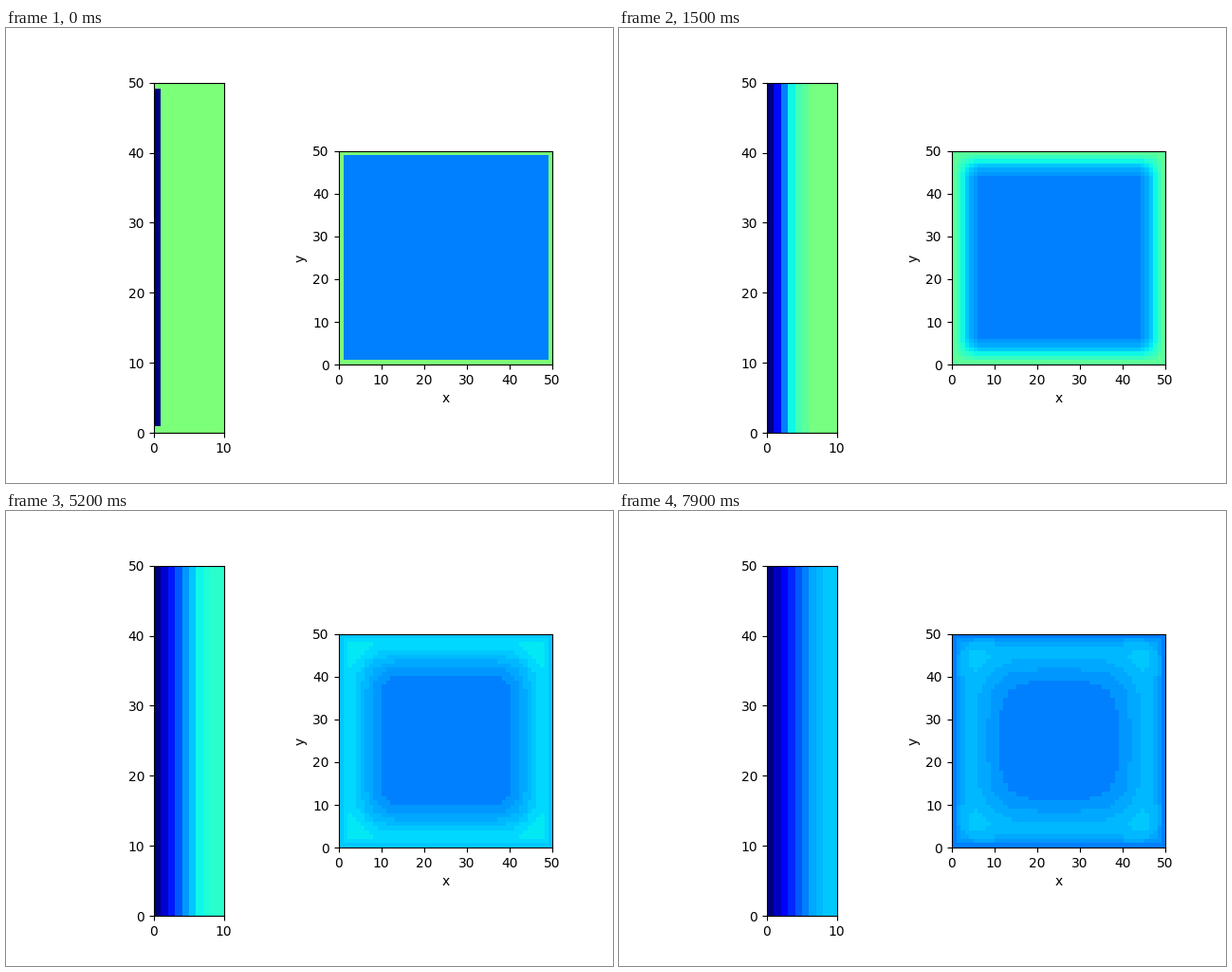
Write a matplotlib script that moves like this. It is 640 by 480 pixels and loops after 8 s.

```python
import numpy as np
import matplotlib.pyplot as plt
from matplotlib.animation import FuncAnimation
from matplotlib.colors import ListedColormap

FRAMES, INTERVAL = 80, 100
N, DEPTH, PROBE = 50, 10, 5

# Jet in 64 flat bands; the three starting values keep their pure colours.
levels = np.arange(0, 256, 4) + 2
levels[[0, 16, 32]] -= 2
cmap = ListedColormap(plt.get_cmap("jet")(levels))


def relax(u):
    """One diffusion step: each inner cell becomes the mean of its neighbours."""
    new = u.copy()
    new[1:-1, 1:-1] = 0.25 * (u[:-2, 1:-1] + u[2:, 1:-1]
                              + u[1:-1, :-2] + u[1:-1, 2:])
    return new


def step_wall(u):
    """Cold left side, insulated elsewhere."""
    u = relax(u)
    u[:, -1] = u[:, -2]
    u[0], u[-1] = u[1], u[-2]
    return u


def step_room(u, edge):
    u = relax(u)
    u[0] = u[-1] = edge
    u[:, 0] = u[:, -1] = edge
    return u


def simulate():
    wall = np.full((N, DEPTH), 0.5)
    wall[1:-1, 0] = 0.0
    room = np.full((N, N), 0.5)
    room[1:-1, 1:-1] = 0.25
    states = [(wall, room)]
    for _ in range(FRAMES - 1):
        wall = step_wall(wall)
        room = step_room(room, wall[N // 2, PROBE])
        states.append((wall, room))
    return states


states = simulate()

plt.rcParams["font.family"] = "DejaVu Sans"
fig, axes = plt.subplots(1, 2, figsize=(6.4, 4.8), dpi=100)
images = []
for ax, u in zip(axes, states[0]):
    rows, cols = u.shape
    images.append(ax.imshow(cmap(u), origin="lower", interpolation="nearest",
                            extent=(0, cols, 0, rows)))
    ax.set_xticks(range(0, cols + 1, 10))
    ax.set_yticks(range(0, rows + 1, 10))
axes[1].set_xlabel("x")
axes[1].set_ylabel("y")


def update(i):
    for image, u in zip(images, states[i]):
        image.set_data(cmap(u))
    return images


anim = FuncAnimation(fig, update, frames=FRAMES, interval=INTERVAL,
                     repeat=True, repeat_delay=0)
plt.show()
```
